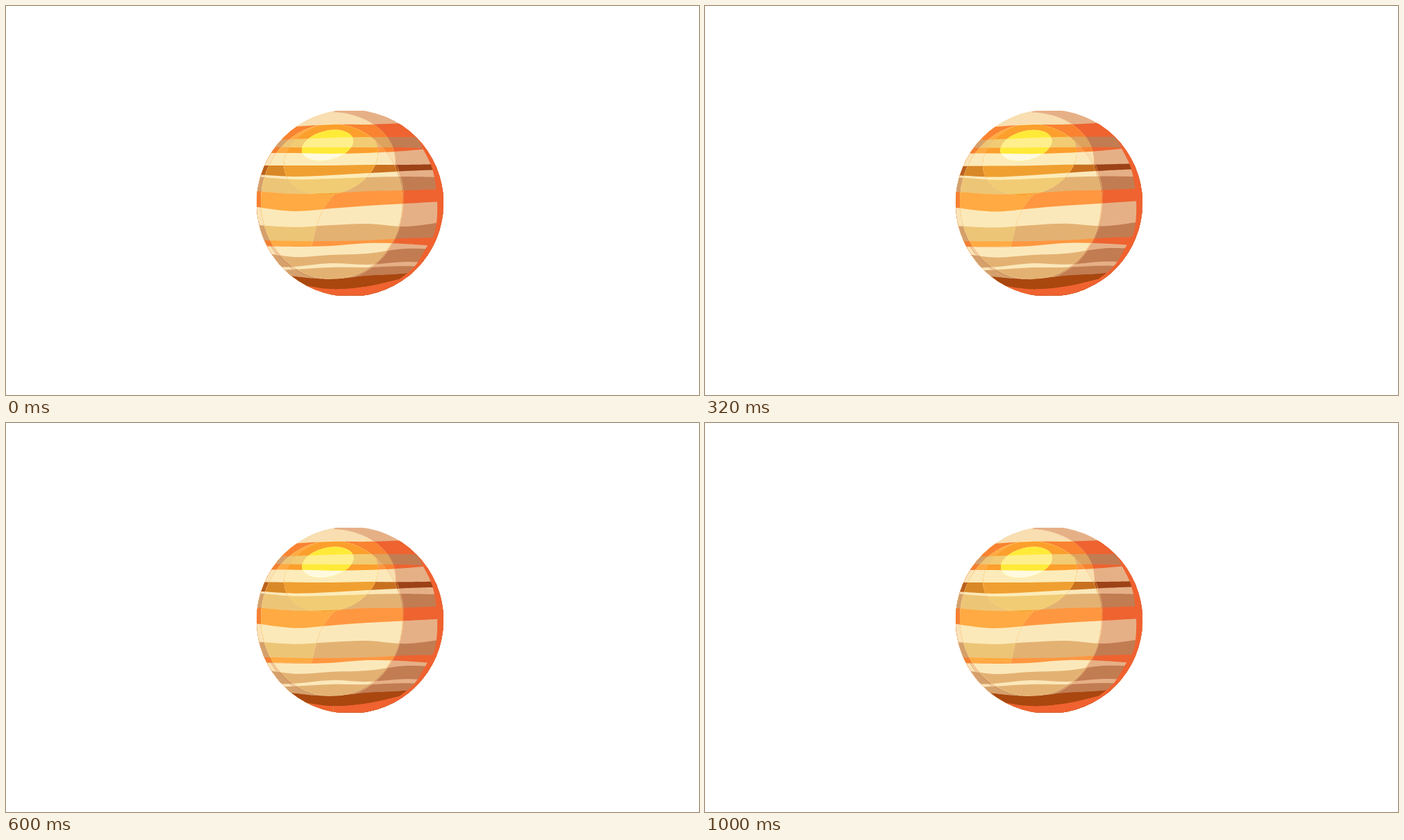
Write an HTML page with a canvas that moves like this. It is 998 px wide and 561 px high and loops after 1.04 s.

```html
<!DOCTYPE html>
<html lang="en">
<head>
<meta charset="utf-8">
<title>Planet</title>
<style>
html, body { margin: 0; width: 100%; height: 100%; overflow: hidden; background: #fff; }
canvas { display: block; }
</style>
</head>
<body>
<canvas id="stage" width="998" height="561"></canvas>
<script>
const ctx = document.getElementById('stage').getContext('2d');
const LOOP = 1040, STEP = 40;
const CX = 495.5, CY = 284.2, R = 134.6;

// Top edge of each band, at evenly spaced x; C cream, T tan, O orange, B brown, R red
const X0 = 362, DX = 53;
const bands = [
  ['O', 180, 174, 171, 171, 169, 168],
  ['T', 194, 192, 190, 189, 189, 190],
  ['O', 203, 204, 204, 204, 204, 206],
  ['C', 212, 212, 213, 212, 209, 204],
  ['B', 230, 230, 230, 229, 229, 228],
  ['C', 243, 246, 244, 241, 238, 236],
  ['T', 246, 250, 249, 247, 246, 247],
  ['O', 267, 271, 270, 267, 266, 264],
  ['C', 290, 296, 292, 288, 285, 282],
  ['T', 316, 319, 316, 314, 318, 312],
  ['O', 338, 339, 339, 338, 335, 334],
  ['C', 346, 347, 346, 342, 343, 347],
  ['T', 354, 362, 359, 357, 350, 351],
  ['C', 377, 376, 371, 373, 369, 371],
  ['T', 382, 380, 377, 377, 375, 377],
  ['B', 382, 390, 394, 389, 386, 378],
  ['R', 390, 400, 408, 404, 392, 382]
];

const RED = '#f0622f', DARK = '#a9470f';
const tones = (C, T, O, B) => ({ C, T, O, B, R: RED });
const shade = tones('#e6b087', '#c27c52', '#ee6330', '#9c4216');
const ring = tones('#f0cb9d', '#d09a66', '#f67c33', '#b3561a');
const halo = tones('#f8deb0', '#dca25e', '#f98331', '#b9601f');
const rim = tones('#fae3b7', '#d4a06c', '#f58032', '#b9601f');
const lit = tones('#fbe8ba', '#e3b273', '#ff9740', '#c8701f');
const warm = tones('#fce9b9', '#edc577', '#ffaa42', '#d98827');
const glow = tones('#fdecb9', '#f1cc74', '#fc9f2c', '#f0a031');
const shine = tones('#fffadf', '#ffef8c', '#ffea38', '#f5b03a');

// Smooth curve through points
function curve(pts) {
  for (let i = 0; i < pts.length - 1; i++) {
    const a = pts[i - 1] || pts[i], b = pts[i], c = pts[i + 1], d = pts[i + 2] || c;
    ctx.bezierCurveTo(
      b[0] + (c[0] - a[0]) / 6, b[1] + (c[1] - a[1]) / 6,
      c[0] - (d[0] - b[0]) / 6, c[1] - (d[1] - b[1]) / 6, c[0], c[1]);
  }
}

function drawBands(tone) {
  ctx.fillStyle = tone.C;
  ctx.fillRect(355, 145, 281, 279);
  for (const [key, ...ys] of bands) {
    const pts = ys.map((y, i) => [X0 + i * DX, y]);
    ctx.beginPath();
    ctx.moveTo(350, ys[0]);
    ctx.lineTo(...pts[0]);
    curve(pts);
    ctx.lineTo(640, ys[5]);
    ctx.lineTo(640, 430);
    ctx.lineTo(350, 430);
    ctx.fillStyle = tone[key];
    ctx.fill();
  }
}

function clipTo(trace) {
  ctx.beginPath();
  trace();
  ctx.clip();
}

function zone(trace, tone) {
  ctx.save();
  clipTo(trace);
  drawBands(tone);
  ctx.restore();
}

const oval = (x, y, rx, ry, turn = 0) => () => ctx.ellipse(x, y, rx, ry, turn, 0, Math.PI * 2);
const box = (x, y, w, h) => () => ctx.rect(x, y, w, h);

function warmSide() {
  ctx.moveTo(350, 145);
  ctx.lineTo(533, 145);
  ctx.lineTo(533, 213);
  curve([[533, 213], [508, 243], [470, 275], [452, 303], [440, 346]]);
  ctx.lineTo(350, 346);
}

function crescent() {
  ctx.beginPath();
  ctx.moveTo(548, 150);
  curve([[548, 150], [566, 170], [590, 189], [602, 209], [614, 235], [620, 268],
    [621, 300], [617, 328], [605, 349], [588, 376], [560, 399]]);
  ctx.lineTo(560, 430);
  ctx.lineTo(645, 430);
  ctx.lineTo(645, 150);
  ctx.fillStyle = RED;
  ctx.fill();
}

function footBand() {
  const [top, bottom] = bands.slice(-2).map(b => b.slice(1).map((y, i) => [X0 + i * DX, y]));
  ctx.beginPath();
  ctx.moveTo(...top[0]);
  curve(top);
  ctx.lineTo(...bottom[5]);
  curve(bottom.reverse());
  ctx.fillStyle = DARK;
  ctx.fill();
}

function planet() {
  clipTo(box(361, 151, 269, 266.5));
  clipTo(oval(CX, CY, R, R));
  drawBands(shade);
  zone(box(355, 145, 117, 280), rim);
  zone(oval(468, 280, 105, 117), ring);
  zone(oval(468, 224, 93, 71), halo);
  zone(box(355, 176, 45, 170), rim);
  ctx.save();
  clipTo(oval(469, 282, 102, 112));
  drawBands(lit);
  zone(warmSide, warm);
  zone(oval(468, 220, 69, 51, -0.3), glow);
  zone(oval(463, 201, 38, 21, -0.25), shine);
  ctx.restore();
  footBand();
  crescent();
}

// Tilt in degrees over time
const tilt = [[0, 0], [120, 2.1], [160, 2.1], [320, -0.4], [520, 0.5], [680, 0], [840, -1.3], [1000, 0], [1040, 0]];

function angle(t) {
  const i = tilt.findIndex(k => k[0] > t);
  const [t0, a] = tilt[i - 1], [t1, b] = tilt[i];
  const p = (t - t0) / (t1 - t0);
  return a + (b - a) * (1 - Math.cos(p * Math.PI)) / 2;
}

function draw(now) {
  const t = Math.floor((now % LOOP) / STEP) * STEP;
  ctx.fillStyle = '#fff';
  ctx.fillRect(0, 0, 998, 561);
  ctx.save();
  ctx.translate(CX, CY);
  ctx.rotate(angle(t) * Math.PI / 180);
  ctx.translate(-CX, -CY);
  planet();
  ctx.restore();
}

let start;
function tick(now) {
  start ??= now;
  draw(now - start);
  requestAnimationFrame(tick);
}
draw(0);
requestAnimationFrame(tick);
</script>
</body>
</html>
```
